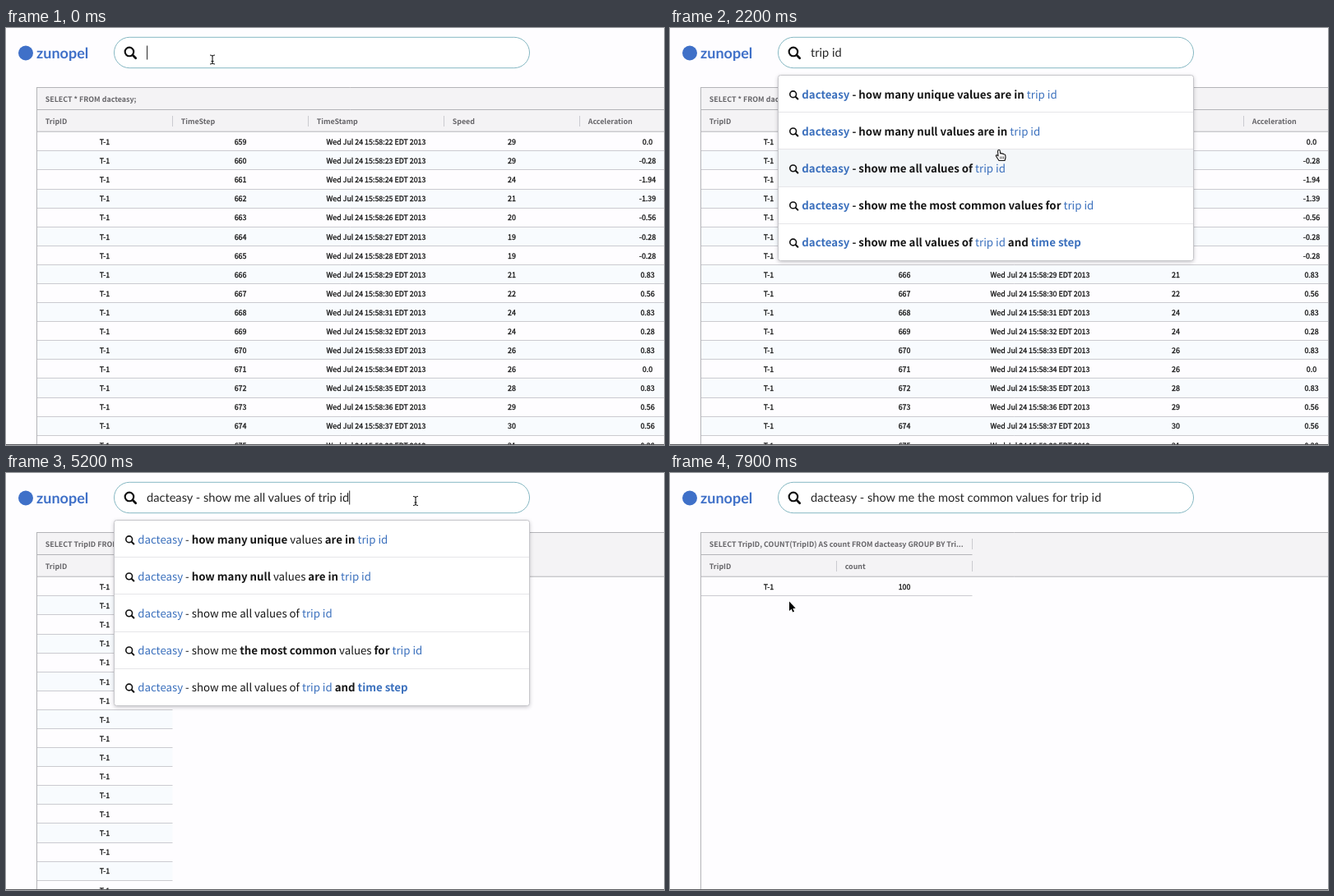
Animation of 800x508 px, one loop 8 s. Source, as an HTML page with a canvas:

```html
<!DOCTYPE html>
<html lang="en">
<head>
<meta charset="utf-8">
<title>Table search</title>
<style>
  html, body { margin: 0; width: 100%; height: 100%; overflow: hidden; background: #fefdff; }
  canvas { display: block; }
</style>
</head>
<body>
<canvas id="stage" width="800" height="508"></canvas>
<script>
const ctx = document.getElementById('stage').getContext('2d');
const LOOP = 8000, TICK = 100;

const SANS = "'Noto Sans CJK JP', 'Noto Sans CJK SC', 'Noto Sans CJK', 'Open Sans', sans-serif";
const LATO = "Lato, sans-serif";
const CELL = `8.86px ${SANS}`;
const HEAD = `bold 8.88px ${SANS}`;
const ITEM = `13.28px ${SANS}`;
const QUERY = `14.64px ${LATO}`;
const BLUE = '#3b70bd', LINE = '#cbcbd0', EDGE = '#b4b4b8';

const COL = 165, LEFT = 37.5, ROW = 23.09, FIRST = 126.8;
const SPEED = [29, 29, 24, 21, 20, 19, 19, 21, 22, 24, 24, 26, 26, 28, 29, 30, 31];
const ACCEL = ['0.0', -0.28, -1.94, -1.39, -0.56, -0.28, -0.28, 0.83, 0.56,
  0.83, 0.28, 0.83, '0.0', 0.83, 0.56, 0.56, 0.28];

const TRIPS = SPEED.map((speed, i) =>
  ['T-1', 659 + i, `Wed Jul 24 15:58:${22 + i} EDT 2013`, speed, ACCEL[i]]);

const TABLES = [
  { from: 0, sql: 'SELECT * FROM dacteasy;', rows: TRIPS,
    cols: ['TripID', 'TimeStep', 'TimeStamp', 'Speed', 'Acceleration'] },
  { from: 3000, sql: 'SELECT TripID FROM dacteasy;', rows: TRIPS.map(r => [r[0]]),
    cols: ['TripID'] },
  { from: 6900, sql: 'SELECT TripID, COUNT(TripID) AS count FROM dacteasy GROUP BY Tri...',
    rows: [['T-1', 100]], cols: ['TripID', 'count'] }
];

const ITEMS = [
  'how many unique values are in trip id',
  'how many null values are in trip id',
  'show me all values of trip id',
  'show me the most common values for trip id',
  'show me all values of trip id and time step'
].map(s => 'dacteasy - ' + s);
const FIELDS = ['dacteasy', 'trip', 'id', 'time', 'step'];

const TYPED = 'trip id', TYPE_START = 300, TYPE_END = 1150, KEY = 140;
const PICK = [2800, 6800];
const MENU = [[800, PICK[0]], [4400, PICK[1]]];
// start, end, blink origin
const FOCUS = [[0, PICK[0], TYPE_END], [4050, PICK[1], 4050]];
const BLINK = 1100;

// time, x, y of the cursor hot spot
const PATH = [
  [0, 251, 38.5], [1400, 251, 38.5], [2150, 400, 149], [2300, 400, 149],
  [2700, 477.3, 165.3], [3450, 477.3, 165.3], [4000, 498, 34], [6100, 498, 34],
  [6400, 533, 229], [7100, 533, 229], [7800, 145, 156.5], [LOOP, 145, 156.5]
];

const HAND = new Path2D('M-1.5 1Q-1.5-.5 0-.5Q1.3-.5 1.3 1L1.6 4Q3 3 4 4.3Q5.2 3.7 6 5' +
  'Q7.6 4.6 7.8 6.4L8 9L7 12.5H0L-3 8Q-4.4 6.2-3 5.8Q-2 5.8-1 7Z');
const FINGERS = new Path2D('M1.6 7.5V10.5M3.6 7.5V10.5M5.6 7.5V10.5');
const ARROW = new Path2D('M0 0V11.5L2.6 9.2L4.3 13L6 12.2L4.4 8.5L7.7 8.2Z');
const IBEAM = new Path2D('M-3-5.5Q-.3-5.5 0-4Q.3-5.5 3-5.5M0-4V4M-3 5.5Q-.3 5.5 0 4Q.3 5.5 3 5.5M-1.5 2H1.5');

const within = (t, [a, b]) => t >= a && t < b;
const ease = k => k * k * (3 - 2 * k);

function text(str, x, y, font, color, align = 'left') {
  ctx.font = font;
  ctx.fillStyle = color;
  ctx.textAlign = align;
  ctx.fillText(str, x, y);
}

// Medium weight: regular glyphs with a hairline outline.
function mediumText(str, x, y, font, color, align) {
  text(str, x, y, font, color, align);
  ctx.strokeStyle = color;
  ctx.lineWidth = 0.3;
  ctx.strokeText(str, x, y);
}

function line(x1, y1, x2, y2, color, width = 1) {
  ctx.strokeStyle = color;
  ctx.lineWidth = width;
  ctx.beginPath();
  ctx.moveTo(x1, y1);
  ctx.lineTo(x2, y2);
  ctx.stroke();
}

function rect(x, y, w, h, color) {
  ctx.fillStyle = color;
  ctx.fillRect(x, y, w, h);
}

function box(x, y, w, h, r, fill, stroke) {
  ctx.beginPath();
  ctx.roundRect(x, y, w, h, r);
  if (fill) {
    ctx.fillStyle = fill;
    ctx.fill();
  }
  if (stroke) {
    ctx.strokeStyle = stroke;
    ctx.lineWidth = 1;
    ctx.stroke();
  }
}

function lens(x, y, s) {
  ctx.strokeStyle = '#111';
  ctx.lineWidth = s * 0.14;
  ctx.lineCap = 'round';
  ctx.beginPath();
  ctx.arc(x + s * 0.41, y + s * 0.41, s * 0.34, 0, Math.PI * 2);
  ctx.stroke();
  ctx.lineWidth = s * 0.18;
  ctx.beginPath();
  ctx.moveTo(x + s * 0.69, y + s * 0.69);
  ctx.lineTo(x + s * 0.91, y + s * 0.91);
  ctx.stroke();
  ctx.lineCap = 'butt';
}

function drawTable({ sql, cols, rows }) {
  const full = cols.length === 5;
  const right = full ? 800 : LEFT + COL * cols.length;
  rect(LEFT, 73, 800, 53, '#f4f3f5');
  rows.forEach((row, i) => {
    const top = Math.floor(FIRST + ROW * i);
    const end = Math.floor(FIRST + ROW * (i + 1));
    if (i % 2) rect(LEFT, top + 1, right - LEFT, end - top - 1, '#f8fbfe');
    line(LEFT, end + 0.5, right, end + 0.5, LINE);
    row.forEach((v, c) =>
      mediumText(v, 120 + COL * c, FIRST + ROW * i + 15.3, CELL, '#111', 'center'));
  });

  line(LEFT, 72.5, 800, 72.5, EDGE);
  line(LEFT, 99.5, right, 99.5, EDGE);
  line(LEFT, 126.2, 800, 126.2, EDGE);
  line(LEFT, 72, LEFT, 508, EDGE);
  text(sql, 47.7, 90.4, HEAD, '#67666a');
  cols.forEach((name, c) => {
    text(name, 47.7 + COL * c, 117, HEAD, '#67666a');
    const x = LEFT + COL * (c + 1);
    line(x, 107, x, 120, LINE);
  });
  if (!full) line(right, 80, right, 93, LINE);
}

function queryAt(t) {
  if (t >= PICK[1]) return ITEMS[3];
  if (t >= PICK[0]) return ITEMS[2];
  const n = Math.floor((t - TYPE_START) / KEY) + 1;
  return TYPED.slice(0, Math.max(0, n));
}

function drawSearch(t, query) {
  box(131.5, 11.3, 505, 37.4, 18.7, '#fff', '#86b8c3');
  lens(143.6, 22.6, 15.5);
  text(query, 171, 35.3, QUERY, '#262626');
  const focus = FOCUS.find(f => within(t, f));
  if (!focus) return;
  const on = t < TYPE_END || (t - focus[2]) % BLINK < BLINK / 2;
  if (!on) return;
  const x = 171.6 + ctx.measureText(query).width;
  line(x, 21.5, x, 38.5, '#222');
}

// Words already in the query are regular, the rest bold.
function drawItem(str, y, known) {
  let x = 160.3;
  lens(145, y - 4.9, 11.4);
  str.split(' ').forEach(word => {
    const font = (known.includes(word) ? '' : 'bold ') + ITEM;
    text(word, x, y + 4.7, font, FIELDS.includes(word) ? BLUE : '#161616');
    x += ctx.measureText(word + ' ').width;
  });
}

function drawMenu(query, cur) {
  ctx.save();
  ctx.shadowColor = 'rgba(30,30,40,.28)';
  ctx.shadowBlur = 5;
  ctx.shadowOffsetY = 1.5;
  box(131.5, 57.5, 505, 226, 3, '#fff');
  ctx.restore();
  const known = query.split(' ');
  ITEMS.forEach((str, i) => {
    const top = 57.5 + 45.2 * i;
    const hot = cur.shown && cur.x > 131 && cur.x < 637 && cur.y >= top && cur.y < top + 45.2;
    if (hot) rect(132, top, 504, 45.2, '#f4f7f9');
    if (i) line(132, Math.floor(top) + 0.5, 636, Math.floor(top) + 0.5, '#e6e6e9');
    drawItem(str, 81 + 45.05 * i, known);
  });
  box(131.5, 57.5, 505, 226, 3, null, '#c6c6ca');
}

function cursorAt(t) {
  const i = PATH.findIndex(p => p[0] > t);
  const [t0, x0, y0] = PATH[i - 1], [t1, x1, y1] = PATH[i];
  const k = ease((t - t0) / (t1 - t0));
  return { x: x0 + (x1 - x0) * k, y: y0 + (y1 - y0) * k, shown: t < TYPE_START || t >= 1400 };
}

function drawCursor({ x, y, shown }, open) {
  if (!shown) return;
  const wide = x > 131 && x < 637;
  ctx.save();
  ctx.translate(x, y);
  ctx.lineJoin = 'round';
  if (wide && y > 11 && y < 49) {
    ctx.strokeStyle = '#111';
    ctx.lineWidth = 1.1;
    ctx.stroke(IBEAM);
  } else if (open && wide && y > 57 && y < 284) {
    ctx.fillStyle = '#fff';
    ctx.fill(HAND);
    ctx.strokeStyle = '#111';
    ctx.lineWidth = 1.1;
    ctx.stroke(HAND);
    ctx.lineWidth = 0.7;
    ctx.stroke(FINGERS);
  } else {
    ctx.strokeStyle = '#fff';
    ctx.lineWidth = 1.6;
    ctx.stroke(ARROW);
    ctx.fillStyle = '#000';
    ctx.fill(ARROW);
  }
  ctx.restore();
}

function drawBrand() {
  ctx.fillStyle = '#3f70c8';
  ctx.beginPath();
  ctx.arc(24, 30.5, 9, 0, Math.PI * 2);
  ctx.fill();
  text('zunopel', 37, 36.5, `bold 18px ${LATO}`, '#3f70c8');
}

function draw(t) {
  const open = MENU.some(m => within(t, m));
  const query = queryAt(t);
  const cur = cursorAt(t);
  ctx.textRendering = 'geometricPrecision';
  rect(0, 0, 800, 508, '#fefdff');
  drawBrand();
  drawTable(TABLES.filter(d => t >= d.from).pop());
  rect(0, 507, 800, 1, '#5c5c60');
  drawSearch(t, query);
  if (open) drawMenu(query, cur);
  drawCursor(cur, open);
}

function loop() {
  const t = performance.now() % LOOP;
  draw(Math.floor(t / TICK) * TICK);
  requestAnimationFrame(loop);
}
loop();
</script>
</body>
</html>
```
